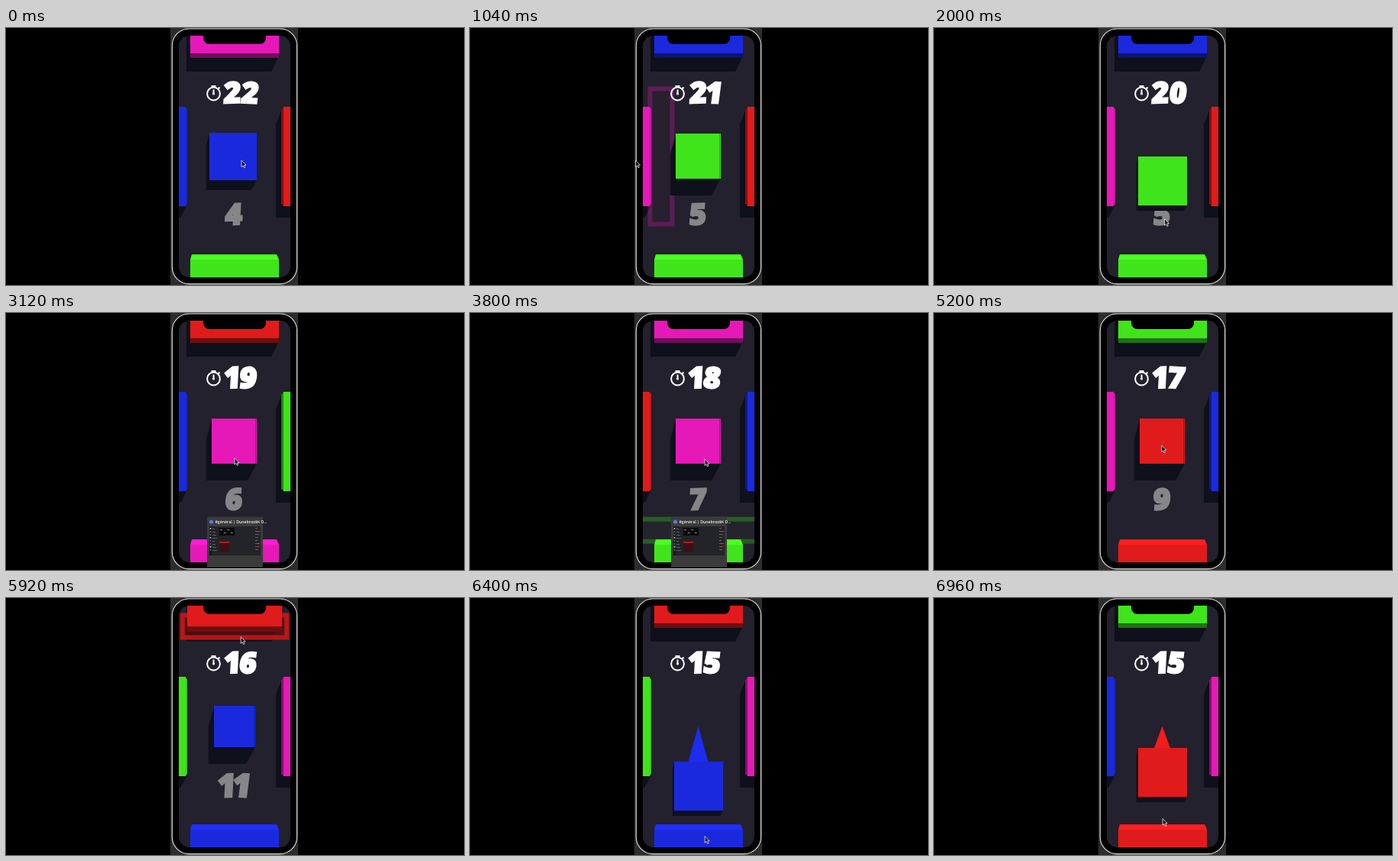
Write an HTML page with a canvas that moves like this. It is 599 px wide and 336 px high and loops after 7 s.

```html
<!DOCTYPE html>
<html lang="en">
<head>
<meta charset="utf-8">
<title>Color flick</title>
<style>
html, body { margin: 0; width: 100%; height: 100%; overflow: hidden; background: #000; }
canvas { display: block; }
</style>
</head>
<body>
<canvas id="stage" width="599" height="336"></canvas>
<script>
const ctx = document.getElementById('stage').getContext('2d');
const LOOP = 7000, STEP = 40;
const HOME = { x: 298.5, y: 167.5 };
const COLORS = { M: [229, 25, 184], B: [27, 41, 221], R: [224, 27, 27], G: [64, 228, 27] };
const SHADE = '#0e101b';

// wall order, also the flick directions
const TOP = 0, LEFT = 1, RIGHT = 2, BOTTOM = 3;
const DIRS = [[0, -1], [-1, 0], [1, 0], [0, 1]];

// The cube has the colour of the wall it is flicked to.
const makeRound = (walls, to, hit, flick = 200) =>
  ({ walls, to, hit, go: hit - flick, grab: hit - flick - 100, cube: walls[to] });
const ROUNDS = [
  makeRound('MBRG', LEFT, 740, 740),
  makeRound('BMRG', BOTTOM, 2180, 365),
  makeRound('RBGM', BOTTOM, 3500),
  makeRound('MRBG', TOP, 4180),
  makeRound('RGMB', LEFT, 4600),
  makeRound('GMBR', BOTTOM, 5510),
  makeRound('BRGM', TOP, 5850),
  makeRound('RGMB', BOTTOM, 6440),
  makeRound('GBMR', BOTTOM, 7030, 230)
];

const clamp = v => Math.min(1, Math.max(0, v));
const easeOut = (k, n) => 1 - Math.pow(1 - clamp(k), n);
const isFlat = side => side === TOP || side === BOTTOM;
const flickPart = (r, t) => clamp((t - r.go) / (r.hit - r.go));

function tone(key, k = 1, alpha = 1) {
  const c = COLORS[key].map(v => Math.min(255, Math.round(v * k)));
  return `rgba(${c.join(',')},${alpha})`;
}
function rect(color, x, y, w, h) {
  ctx.fillStyle = color;
  ctx.fillRect(x, y, w, h);
}
function poly(color, ...p) {
  ctx.fillStyle = color;
  ctx.beginPath();
  for (let i = 0; i < p.length; i += 2) ctx.lineTo(p[i], p[i + 1]);
  ctx.closePath();
  ctx.fill();
}
function roundPath(x, y, w, h, r) {
  ctx.beginPath();
  ctx.roundRect(x, y, w, h, r);
}
function disc(color, x, y, r) {
  ctx.fillStyle = color;
  ctx.beginPath();
  ctx.arc(x, y, r, 0, 7);
  ctx.fill();
}
function line(color, width, x1, y1, x2, y2) {
  ctx.strokeStyle = color;
  ctx.lineWidth = width;
  ctx.beginPath();
  ctx.moveTo(x1, y1);
  ctx.lineTo(x2, y2);
  ctx.stroke();
}

function drawWallShadows() {
  poly(SHADE, 236, 10, 357, 10, 356, 39, 347, 57, 236, 57);
  poly(SHADE, 226, 233, 236, 233, 229, 247, 226, 248);
  poly(SHADE, 361, 105, 353, 126, 353, 248, 372, 248, 372, 105);
}

const wallFaces = [
  c => {
    rect(tone(c, .5), 241, 33, 116, 6);
    rect(tone(c), 241, 0, 116, 33);
  },
  c => {
    poly(tone(c, .9), 226, 103, 234, 103, 237, 106, 237, 230, 234, 233, 226, 233);
    rect(tone(c), 216, 103, 19, 130);
  },
  c => {
    poly(tone(c, .6), 363, 103, 360, 107, 360, 230, 363, 233);
    rect(tone(c), 363, 103, 19, 130);
  },
  c => {
    poly(tone(c, 1.15), 243, 296, 354, 296, 357, 303, 241, 303);
    rect(tone(c), 241, 303, 116, 33);
  }
];

// A struck wall swells for a moment around its outer edge.
function drawWall(side, color, age) {
  const pop = Math.min(1, age / 50) * (1 - clamp((age - 80) / 200));
  const [dx, dy] = DIRS[side];
  const ax = 299 + dx * 83, ay = 168 + dy * 168;
  const long = 1 + .07 * pop, deep = 1 + .13 * pop;
  ctx.save();
  ctx.translate(ax, ay);
  if (isFlat(side)) ctx.scale(long, deep);
  else ctx.scale(deep, long);
  ctx.translate(-ax, -ay);
  wallFaces[side](color);
  ctx.restore();
}

// Frame that spreads from a struck wall and fades
function drawRing(side, color, age) {
  const fade = 1 - age / 440;
  if (fade <= 0) return;
  const k = easeOut(age / 480, 4);
  const half = (isFlat(side) ? 59 : 66) + 26 * k;
  const edge = (isFlat(side) ? 41 : 23) + 29 * k;
  const depth = 35, band = 6;
  const [dx, dy] = DIRS[side];
  ctx.save();
  ctx.translate(299 + dx * 83, 168 + dy * 168);
  ctx.rotate(Math.atan2(-dy, -dx) - Math.PI / 2);
  rect(tone(color, .5, Math.pow(fade, 3)), -half, edge - depth, half * 2, depth);
  ctx.strokeStyle = tone(color, .92, fade);
  ctx.lineWidth = band;
  ctx.strokeRect(band / 2 - half, edge - depth + band / 2, half * 2 - band, depth - band);
  ctx.restore();
}

function drawCube(r, t, age) {
  const [dx, dy] = DIRS[r.to];
  const grab = clamp((t - r.grab) / 80);
  const u = flickPart(r, t), lift = Math.min(1, u * 2);
  const off = 2 * grab + (dx ? 66 : 120) * u * u;
  const x = HOME.x + dx * off, y = HOME.y + dy * off;
  const size = Math.round(59 * easeOut(age / 150, 4) + 3 * grab + 2 * lift);
  const left = Math.round(x - size / 2), top = Math.round(y - size / 2);
  const right = left + size, bottom = top + size;

  const drop = 22 - 9 * grab - 6 * lift, low = bottom + drop;
  const s = size - .22 * drop, sx = left - drop * .33;
  poly(SHADE, left, top + 2, sx, low - s, sx, low, sx + s, low, right, bottom, right, top);

  if (off > 30) {
    poly(tone(r.cube, 1.08), HOME.x, HOME.y,
      x - dy * 22, y - dx * 22, x + dy * 22, y + dx * 22);
  }
  rect(tone(r.cube), left, top, size, size);
  if (!grab) rect(tone(r.cube, .72), right - 2, top, 1, size);
}

function drawNumber(n, cx, base, color, scale = 1) {
  const chars = [...String(n)];
  const step = c => c === '1' ? 17 : 22;
  const total = chars.reduce((sum, c) => sum + step(c), 0);
  ctx.save();
  ctx.translate(cx, base);
  ctx.scale(scale, scale);
  ctx.font = '800 38px "Open Sans", sans-serif';
  ctx.textAlign = 'center';
  ctx.fillStyle = ctx.strokeStyle = color;
  ctx.lineWidth = 2.4;
  let x = -total / 2;
  chars.forEach((c, i) => {
    ctx.save();
    ctx.translate(x + step(c) / 2, 0);
    ctx.rotate(i % 2 ? .05 : -.03);
    ctx.transform(1, 0, -.08, 1, -1, 0);
    ctx.strokeText(c, 0, 0);
    ctx.fillText(c, 0, 0);
    ctx.restore();
    x += step(c);
  });
  ctx.restore();
}

function drawWatch() {
  ctx.strokeStyle = '#fff';
  ctx.lineWidth = 2;
  ctx.beginPath();
  ctx.arc(271.5, 86, 8.4, 0, 7);
  ctx.stroke();
  rect('#fff', 268.5, 75, 6, 2);
  line('#fff', 2, 277.5, 79.5, 279.5, 77.5);
  line('#fff', 2, 271.5, 80.5, 271.5, 86.5);
  disc('#fff', 271.5, 86, 1.6);
}

function drawPreview() {
  rect('#3b3b3c', 263, 266.5, 73, 65.5);
  disc('#5f74e6', 268.5, 273, 2.6);
  ctx.fillStyle = '#eee';
  ctx.textAlign = 'left';
  ctx.font = '600 5.2px "Open Sans", sans-serif';
  ctx.fillText('#général | Dunebrook - D...', 273.5, 275);
  line('#ddd', .8, 328, 271.3, 331.4, 274.7);
  line('#ddd', .8, 331.4, 271.3, 328, 274.7);

  rect('#232427', 266, 279, 67, 38);
  rect('#161719', 266, 279, 3, 38);
  rect('#0a0a0c', 279, 281, 20, 10);
  rect('#3d1016', 279, 300, 13, 12);
  rect('#c3202b', 279, 299, 13, 1.6);
  for (let i = 0; i < 8; i++) {
    const y = 281 + i * 4;
    rect(i % 3 ? '#77797f' : '#ddd', 266.7, y, 1.6, 1.6);
    rect('#6c6e74', 270, y + 1, 3 + i * 5 % 4, .8);
    rect(i % 3 ? '#70727a' : '#b8474e', 326, y, 3 + i * 3 % 4, .9);
  }
  for (let i = 0; i < 4; i++) rect('#8b8b90', 280 + i * 4.6, 283 + i % 2 * 4, 3, 1);
}

// The pointer pulls ahead of the cube, waits there, then comes back for the next one.
function drawPointer(n, t) {
  const r = ROUNDS[n], last = ROUNDS[n - 1];
  let dir = r.to, part = Math.pow(flickPart(r, t), 1.3);
  if (last && t < r.grab) {
    const back = Math.min(400, r.grab - last.hit);
    dir = last.to;
    part = Math.pow(clamp((r.grab - t) / back), 1.5);
  }
  const [dx, dy] = DIRS[dir];
  ctx.save();
  ctx.translate(303 + 5 * Math.cos(n * 1.88) + dx * 85 * part, 173 + dy * 185 * part);
  poly('#15151c', 0, 0, 0, 8.6, 2, 6.9, 3.4, 9.8, 4.8, 9.1, 3.5, 6.3, 6, 6.1);
  ctx.strokeStyle = '#e8e8e8';
  ctx.lineWidth = .8;
  ctx.stroke();
  ctx.restore();
}

function drawPhone() {
  rect('#000', 0, 0, 599, 336);
  rect('#2d2d2e', 215, 0, 167, 336);
  roundPath(217.3, 1, 163.2, 333.6, 22);
  ctx.fillStyle = '#000';
  ctx.fill();
  ctx.strokeStyle = '#e6e6e6';
  ctx.lineWidth = 1.1;
  ctx.stroke();
}

function drawScreen(n, t) {
  const now = ROUNDS[n], last = ROUNDS[n - 1];
  const age = last ? t - last.hit : Infinity;
  ctx.save();
  roundPath(226, 10, 146, 316, 14);
  ctx.clip();
  rect('#23212d', 226, 10, 146, 316);
  drawWallShadows();
  if (last) drawRing(last.to, now.walls[last.to], age);
  [...now.walls].forEach((color, side) =>
    drawWall(side, color, last && side === last.to ? age : Infinity));
  const pop = 1 + .14 * (1 - clamp(age / 240));
  drawNumber(4 + n, 298.5, 257 + (pop - 1) * 30, '#868688', pop);
  drawCube(now, t, age);
  drawWatch();
  drawNumber(22 - Math.floor((t + 680) / 1000), 307.5, 98, '#fff');
  ctx.restore();

  // notch
  roundPath(258, 4, 82, 17, [0, 0, 8, 8]);
  ctx.fillStyle = '#000';
  ctx.fill();
}

function draw(t) {
  const n = ROUNDS.findIndex(r => t < r.hit);
  drawPhone();
  drawScreen(n, t);
  if (t >= 2640 && t < 4100) drawPreview();
  drawPointer(n, t);
}

const start = performance.now();
function tick() {
  const t = (performance.now() - start) % LOOP;
  draw(Math.floor(t / STEP) * STEP);
  requestAnimationFrame(tick);
}
tick();
</script>
</body>
</html>
```
